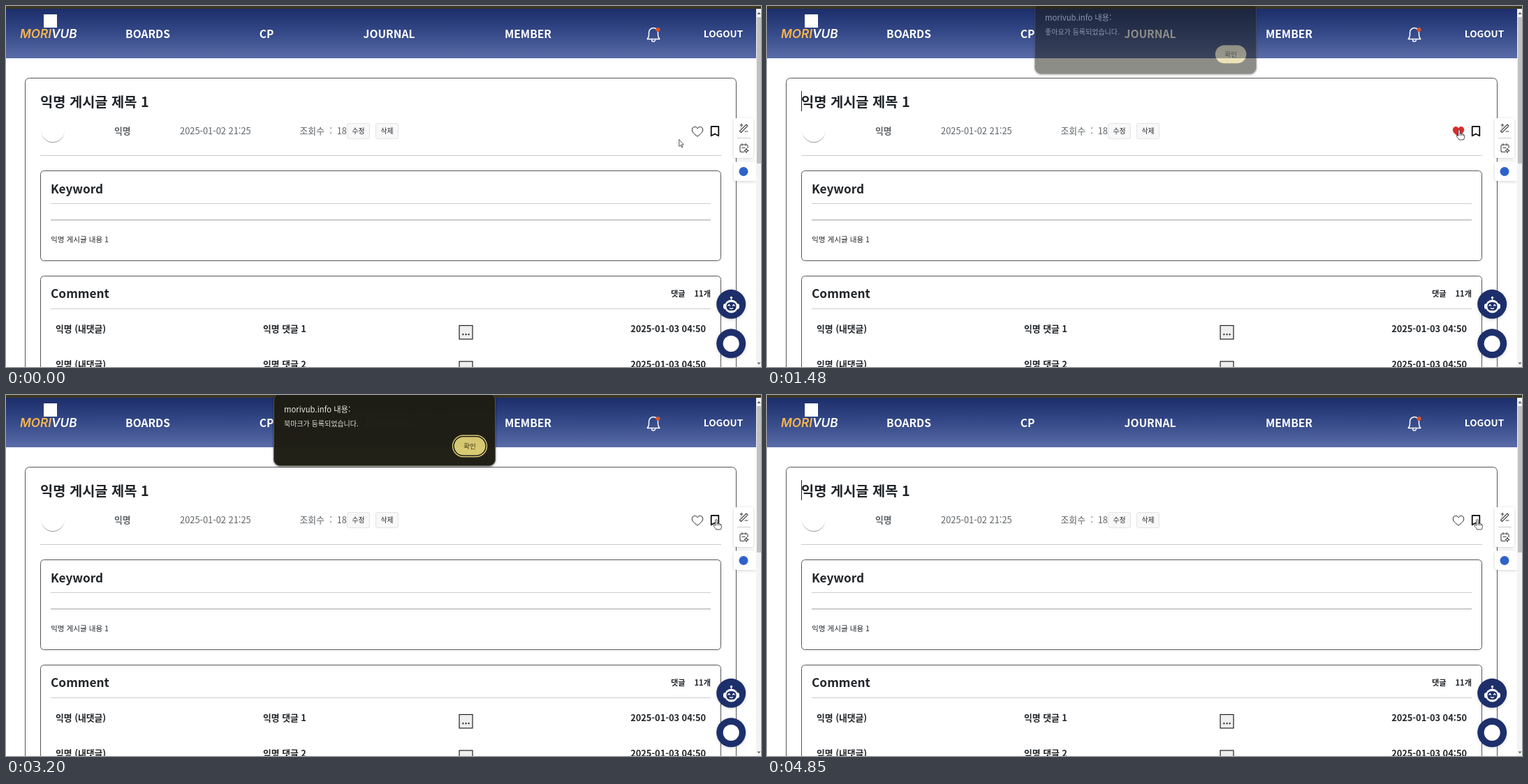
An HTML page that plays this animation: 1081 by 518 pixels, repeating every 4.98 s.

```html
<!DOCTYPE html>
<html lang="ko">
<head>
<meta charset="utf-8">
<style>
  html, body { margin: 0; width: 100%; height: 100%; overflow: hidden; background: #fff; }
  svg { display: block; width: 100%; height: 100%; }
  text { font-family: "Noto Sans CJK KR", "Noto Sans KR", "Noto Sans CJK", "Noto Sans CJK JP", sans-serif; fill: #212529; white-space: pre; }
  .b { font-weight: 700; }
  .mid { text-anchor: middle; }
  .end { text-anchor: end; }
  .nav text { fill: #fff; font-weight: 700; font-size: 15.6px; }
  .meta text { fill: #5f6468; font-size: 12.85px; }
  .row text { font-size: 12.8px; font-weight: 700; }
  .box { fill: #fff; stroke: #555; }
  .line { fill: none; stroke: #ccc; }
  .icon { fill: none; stroke: #444; stroke-width: 1.1; stroke-linecap: round; stroke-linejoin: round; }
  .soft { filter: drop-shadow(0 1px 2px rgba(0,0,0,.18)); }
  .logo { font: italic 600 17.2px Inter, "Open Sans", sans-serif; fill: #fff; }
</style>
</head>
<body>
<svg viewBox="0 0 1081 518">
  <defs>
    <linearGradient id="sky" x2="0" y2="1">
      <stop stop-color="#1c2e6b"/><stop offset=".5" stop-color="#364a89"/><stop offset="1" stop-color="#5a6ca8"/>
    </linearGradient>
    <g id="row" class="row">
      <text x="71" y="467.5">익명 (내댓글)</text>
      <rect x="649" y="458.5" width="19" height="19.5" fill="#efefef" stroke="#222" stroke-width="1.2"/>
      <text class="mid" x="658.5" y="472">...</text>
      <text class="end" x="1002" y="467.5">2025-01-03 04:50</text>
    </g>
  </defs>

  <rect width="1081" height="518" fill="#fff"/>

  <!-- header -->
  <rect y="4" width="1074" height="71" fill="url(#sky)"/>
  <rect width="1081" height="4" fill="#3b3724"/>
  <rect x="54" y="12" width="19" height="19" fill="#fff"/>
  <text class="logo" x="20" y="46"><tspan fill="#f8b54c">MORI</tspan>VUB</text>
  <g class="nav">
    <text class="mid" x="203" y="46">BOARDS</text>
    <text class="mid" x="373" y="46">CP</text>
    <text class="mid" x="548.5" y="46">JOURNAL</text>
    <text class="mid" x="747.5" y="46">MEMBER</text>
    <text class="mid" x="1027" y="45.3" style="font-size:13.5px">LOGOUT</text>
  </g>
  <path d="M918.2 47.5q2.300-2.500 2.300-6v-3.500a6.500 6.500 0 0 1 13 0v3.500q0 3.500 2.300 6zM924.500 48.500a2.500 2.500 0 0 0 5 0" fill="none" stroke="#fff" stroke-width="1.5" stroke-linejoin="round"/>
  <circle cx="933.5" cy="34" r="3" fill="#d9542b"/>

  <!-- post -->
  <rect class="box" x="27.5" y="103.5" width="1018" height="440" rx="6"/>
  <text class="b" x="49" y="145" font-size="19.8">익명 게시글 제목 1</text>
  <circle cx="67" cy="179.7" r="16.5" fill="#aaa"/>
  <circle cx="67" cy="178" r="17" fill="#fff"/>
  <g class="meta">
    <text class="b" x="155" y="184.3">익명</text>
    <text x="249" y="184.3">2025-01-02 21:25</text>
    <text x="420.5" y="184.3">조회수</text>
    <text class="mid" x="465" y="184.3">:</text>
    <text class="end" x="488" y="184.3">18</text>
  </g>
  <g fill="#f8f8f9" stroke="#e4e4e4">
    <rect x="488.5" y="168.5" width="32" height="22" rx="2.5"/>
    <rect x="529.5" y="168.5" width="32" height="22" rx="2.5"/>
  </g>
  <g font-size="9.8">
    <text class="mid" x="504.5" y="183.2">수정</text>
    <text class="mid" x="545.5" y="183.2">삭제</text>
  </g>
  <path id="heart" d="M990 187.200C985.500 183.600 982.300 181 982.300 177.700C982.300 173 987.800 171.800 990 175.800C992.200 171.800 997.700 173 997.700 177.700C997.700 181 994.500 183.600 990 187.200Z"/>
  <path id="mark" d="M1009.700 172.900H1020.300V186.300L1015 183.600L1009.700 186.300Z" stroke-width="1.7" stroke-linejoin="round"/>
  <path class="line" d="M49 214.500H1024"/>

  <rect class="box" x="49.5" y="236.5" width="974" height="129" rx="5"/>
  <text class="b" x="64" y="269" font-size="17.2">Keyword</text>
  <path class="line" d="M64 283.500H1009"/>
  <path class="line" d="M64 307H1009" style="stroke:#bbb;stroke-width:1.3"/>
  <text x="64" y="339" font-size="10.6">익명 게시글 내용 1</text>

  <rect class="box" x="49.5" y="387.5" width="974" height="160" rx="5"/>
  <text class="b" x="64" y="419" font-size="17.3">Comment</text>
  <g class="b" font-size="11.2">
    <text x="952" y="416.5">댓글</text>
    <text class="end" x="1009" y="416.5">11개</text>
  </g>
  <path class="line" d="M64 434.500H1009"/>
  <use href="#row"/>
  <use href="#row" y="51.5"/>
  <g class="row">
    <text x="368" y="467.5">익명 댓글 1</text>
    <text x="368" y="519">익명 댓글 2</text>
  </g>

  <!-- side tools -->
  <rect class="soft" x="1042" y="161" width="28" height="57" rx="3" fill="#fff"/>
  <path class="soft" d="M1074 223.500H1046q-4 0-4 4V247q0 4 4 4H1074z" fill="#fff"/>
  <path class="line" d="M1047 189.500H1066"/>
  <path class="icon" d="M1050.500 179.500L1060 170L1062 172L1052.500 181.500ZM1051 171h4M1053 169v4M1058 180h4M1052 175h.1"/>
  <path class="icon" d="M1057 209.500H1053q-2 0-2-2V201q0-2 2-2H1060q2 0 2 2V203.500M1054 197.500V200M1059 197.500V200M1054 203.500H1058M1060 204.500l1 2 2 1-2 1-1 2-1-2-2-1 2-1z"/>
  <circle cx="1056" cy="237.5" r="6.5" fill="#2f62c9"/>

  <!-- chat buttons -->
  <g class="soft" fill="#1d2f6b">
    <circle cx="1038.2" cy="427.8" r="21"/>
    <circle cx="1038.2" cy="484.3" r="21"/>
  </g>
  <circle cx="1038.2" cy="484.5" r="11.5" fill="#fff"/>
  <g fill="#fff">
    <circle cx="1038.5" cy="418.5" r="1.7"/>
    <path d="M1038 419h1v4h-1z"/>
    <rect x="1027" y="427" width="23" height="8" rx="3"/>
    <circle cx="1038.5" cy="431" r="9.5"/>
  </g>
  <rect x="1031.5" y="425" width="14" height="12" rx="5.500" fill="#1d2f6b"/>
  <path d="M1033.500 430.500l1.700-2 1.700 2M1040.100 430.500l1.700-2 1.700 2M1036 433.300q2.500 2.400 5 0" fill="none" stroke="#fff" stroke-width="1.2"/>

  <!-- scrollbar -->
  <rect x="1074" y="4" width="7" height="514" fill="#f3f3f3"/>
  <rect x="1075" y="16" width="6" height="210" fill="#c1c1c1"/>
  <path d="M1075.500 12l2.500-3.500 2.500 3.500zM1075.500 511.500l2.500 3 2.500-3z" fill="#666"/>

  <path id="caret" d="M49.500 122V151" stroke="#222"/>

  <g id="dialog">
    <rect x="383.500" y="1.500" width="317" height="103.500" rx="9" fill="#1e1d14" stroke="#56554c" style="filter:drop-shadow(0 1px 1.500px rgba(0,0,0,.5))"/>
    <text x="398" y="28" font-size="11.3" style="fill:#f1efe4">morivub.info 내용:</text>
    <text id="msg" x="398" y="48.7" font-size="10" style="fill:#e4e2d6"></text>
    <rect id="ring" x="639.5" y="61.5" width="49" height="30.5" rx="15.25" fill="none" stroke="#dccb74" stroke-width="1.4"/>
    <rect x="641.8" y="63.8" width="44.5" height="26" rx="13" fill="#d8c871"/>
    <text class="mid" x="664" y="80.2" font-size="9.6" style="fill:#40390f">확인</text>
  </g>

  <circle id="click" r="8.7" fill="#ff0" fill-opacity=".47"/>
  <g stroke-linejoin="round" fill="#fff">
    <path id="arrow" d="M0 0V10L2.300 7.900L3.800 11.500L5.300 10.900L3.800 7.400H6.600Z" stroke="#333" stroke-width=".8"/>
    <path id="hand" d="M-1.200 8.500V.8a1.200 1.200 0 0 1 2.400 0V5q2-.5 2.200.7 1.900-.5 2.200.7 1.900-.2 1.900 1.400v2.700q0 1.600-1.200 3.500H0Q-1.300 11.500-3.600 9.300q-.8-1.600.6-1.900.9 0 1.800 1.100ZM1.200 5v3M3.400 5.700v2.500M5.600 6.400v2" stroke="#222" stroke-width=".8"/>
  </g>
</svg>
<script>
const LOOP = 4980;
const $ = id => document.getElementById(id);
const show = (id, on) => $(id).setAttribute('visibility', on ? 'visible' : 'hidden');
const move = (id, x, y) => $(id).setAttribute('transform', `translate(${x} ${y})`);
const within = (t, spans) => spans.some(([a, b]) => t >= a && t < b);
const last = (steps, t) => steps.findLast(s => s[0] <= t);
const paint = (id, fill, stroke) => {
  $(id).setAttribute('fill', fill);
  $(id).setAttribute('stroke', stroke);
};

// time, x, y of the pointer's hot spot
const pointer = [
  [0, 963.7, 191.5], [70, 973, 188.5], [140, 983, 185], [340, 991, 178],
  [2450, 992.5, 177], [2580, 1004, 178], [2650, 1016.8, 179]
];
const clicks = [[740, 810], [1700, 1770], [2910, 2980], [4020, 4090]];
const carets = [[70, 540], [1420, 3050], [3670, LOOP]];
const liked = [[1420, 2380]];
const saved = [[3670, 4710]];

// steps: delay, opacity, offset
const quick = [[0, .34, -8.5], [70, .98, -3.5], [140, 1, 0]];
const slow = [[0, .2, -10], [60, .86, -5], [130, 1, -1.5], [200, 1, 0]];
const closing = [[0, 1, 0], [70, .85, -3.5], [140, .5, -7.5], [210, .15, -11.5], [270, 0, -12]];
// opens, closes, message, opening steps
const dialogs = [
  [880, 1280, '좋아요가 등록되었습니다.', quick],
  [1910, 2240, '좋아요가 취소되었습니다.', quick],
  [3130, 3530, '북마크가 등록되었습니다.', quick],
  [4230, 4570, '북마크가 해제되었습니다.', slow]
];

function drawDialog(t) {
  const d = last(dialogs, t);
  show('ring', d && t < d[1]);
  if (!d) return $('dialog').setAttribute('opacity', 0);
  const [open, close, text, opening] = d;
  const [, alpha, y] = t < close ? last(opening, t - open) : last(closing, t - close);
  $('msg').textContent = text;
  $('dialog').setAttribute('opacity', alpha);
  move('dialog', 0, y);
}

function draw() {
  const t = performance.now() % LOOP;
  const [since, x, y] = last(pointer, t);
  for (const id of ['arrow', 'hand', 'click']) move(id, x, y);
  show('arrow', since < 140);
  show('hand', since >= 140);
  show('click', within(t, clicks));
  show('caret', within(t, carets));

  within(t, liked) ? paint('heart', '#dc2b2b', '#dc2b2b') : paint('heart', '#fff', '#222');
  within(t, saved) ? paint('mark', '#fcbf4e', '#fcbf4e') : paint('mark', '#fff', '#000');
  drawDialog(t);
  requestAnimationFrame(draw);
}
draw();
</script>
</body>
</html>
```
